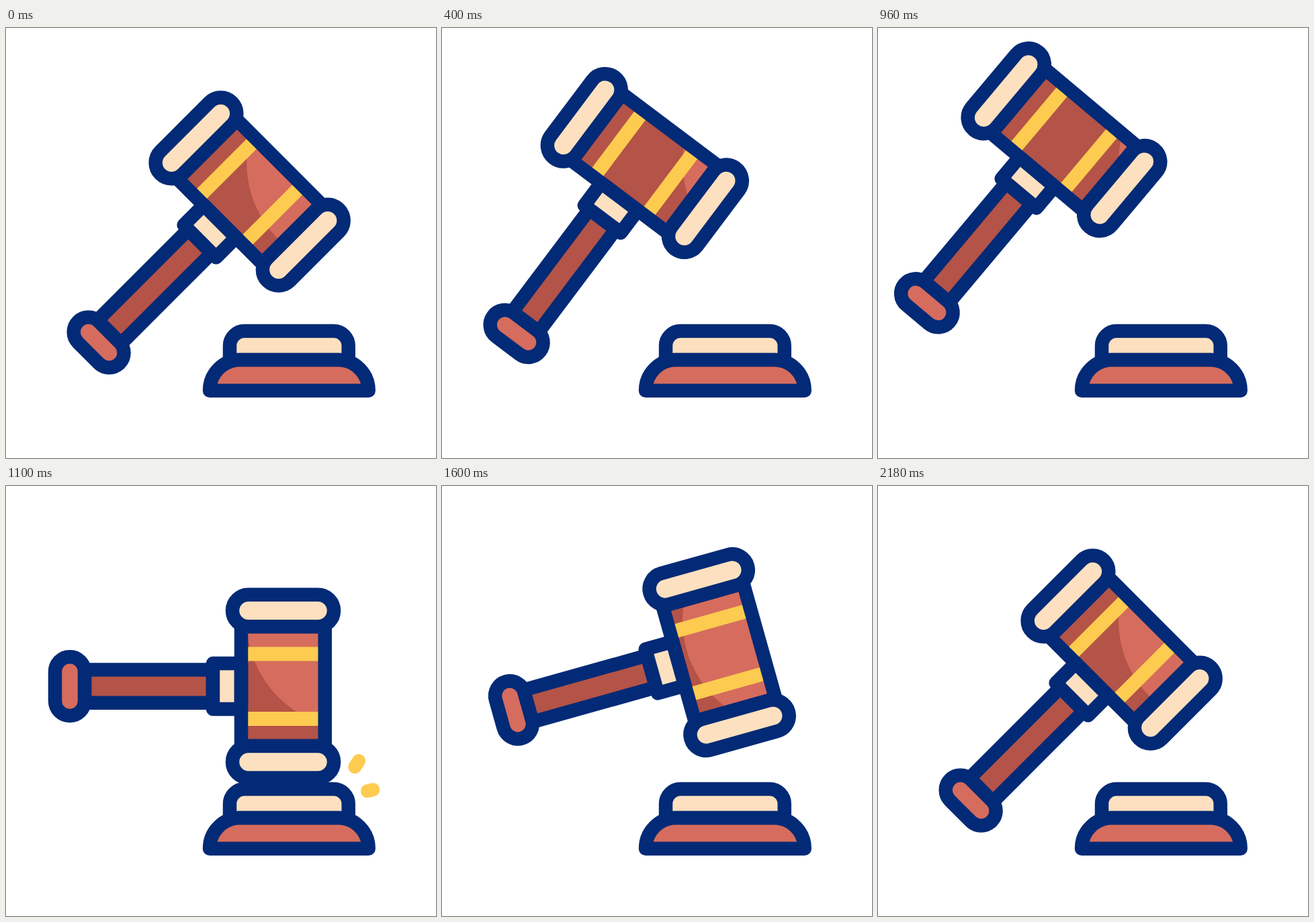
Write an HTML page without scripts that moves like this. It is 640 px wide and 640 px high and loops after 2400 ms.

```html
<!DOCTYPE html>
<html lang="en">
<head>
<meta charset="utf-8">
<title>Gavel</title>
<style>
  @property --head { syntax: "<length>"; inherits: false; initial-value: 0px; }
  @property --tail { syntax: "<length>"; inherits: false; initial-value: 0px; }

  :root {
    --navy: #032a76;
    --red: #d66c5d;
    --dark: #b45347;
    --cream: #fde0bf;
    --gold: #fdcb50;
    --ease: cubic-bezier(.333, 0, .667, 1);
  }
  html, body { margin: 0; width: 100%; height: 100%; overflow: hidden; background: #fff; }
  svg { display: block; width: 100%; height: 100%; }

  .line { stroke: var(--navy); stroke-width: 20.5; stroke-linejoin: round; }
  .red { fill: var(--red); }
  .dark { fill: var(--dark); }
  .cream { fill: var(--cream); }
  .gold { fill: var(--gold); }

  .gavel {
    transform-origin: 175px 298px;
    animation: shift 2.4s infinite var(--ease), spin 2.4s infinite var(--ease);
  }
  @keyframes shift {
    0%       { translate: 19.6px 113.4px; }
    37.5%    { translate: -65.3px 64.3px; }
    45.8333% { translate: 0px 0px; }
    58.3333% { translate: -7.2px -37.5px; animation-timing-function: cubic-bezier(.4, 0, .75, .65); }
    67.5%    { translate: 11.2px 21px; animation-timing-function: linear; }
    72.5%    { translate: 26px 66px; animation-timing-function: linear; }
    75.8333% { translate: 24.5px 91.7px; animation-timing-function: cubic-bezier(.3, .5, .7, .95); }
    81.6667% { translate: 26.7px 111.3px; }
    90.8333%, 100% { translate: 19.6px 113.4px; }
  }
  @keyframes spin {
    0%       { rotate: -45deg; }
    37.5%    { rotate: -64.3deg; }
    45.8333% { rotate: 0deg; }
    58.3333% { rotate: -9.9deg; animation-timing-function: cubic-bezier(.4, 0, .67, .55); }
    75.8333% { rotate: -30.9deg; animation-timing-function: cubic-bezier(.33, .58, .67, 1); }
    90.8333%, 100% { rotate: -45deg; }
  }

  .spark {
    stroke: var(--gold);
    stroke-width: 20;
    stroke-linecap: round;
    stroke-dasharray: calc(var(--head) - var(--tail)) 300px;
    stroke-dashoffset: calc(-1 * var(--tail));
    animation: head 2.4s infinite var(--ease), tail 2.4s infinite var(--ease), show 2.4s infinite step-end;
  }
  @keyframes head {
    0%, 41.6667%   { --head: 0px; }
    61.6667%, 100% { --head: 100px; }
  }
  @keyframes tail {
    0%, 44.1667%   { --tail: 0px; }
    64.1667%, 100% { --tail: 100px; }
  }
  @keyframes show {
    0%, 64.1%, 100% { visibility: hidden; }
    41.7% { visibility: visible; }
  }
</style>
</head>
<body>
<svg viewBox="0 0 640 640">
  <clipPath id="body">
    <rect class="gavel" x="350" y="209" width="124.7" height="178"/>
  </clipPath>

  <path class="spark" pathLength="100" d="M518 420L579 324"/>
  <path class="spark" pathLength="100" d="M536 454.5L625.8 433.6"/>

  <g class="line">
    <path class="cream" d="M333 494V473a22 22 0 0 1 22-22H487.7a22 22 0 0 1 22 22V494z"/>
    <path class="red" d="M303 539.7A45 45.7 0 0 1 348 494H494.7A45 45.7 0 0 1 539.7 539.7z"/>
  </g>

  <!-- the lit area stays put while the head turns through it -->
  <rect class="gavel dark" x="350" y="209" width="124.7" height="178"/>
  <g clip-path="url(#body)">
    <circle class="red" cx="520" cy="200" r="162"/>
  </g>

  <g class="gavel">
    <path class="gold" d="M350 239.5h124.7v21H350zM350 336h124.7v21H350z"/>
    <g class="line">
      <rect class="dark" x="117" y="273.5" width="191" height="49.3"/>
      <rect class="cream" x="308" y="264" width="42" height="68"/>
      <rect class="red" x="73" y="254.3" width="44" height="87.6" rx="22"/>
      <rect fill="none" x="350" y="209" width="124.7" height="178"/>
      <rect class="cream" x="337" y="161.7" width="151" height="47.5" rx="23.7"/>
      <rect class="cream" x="337" y="387" width="151" height="47.5" rx="23.7"/>
    </g>
  </g>
</svg>
</body>
</html>
```
